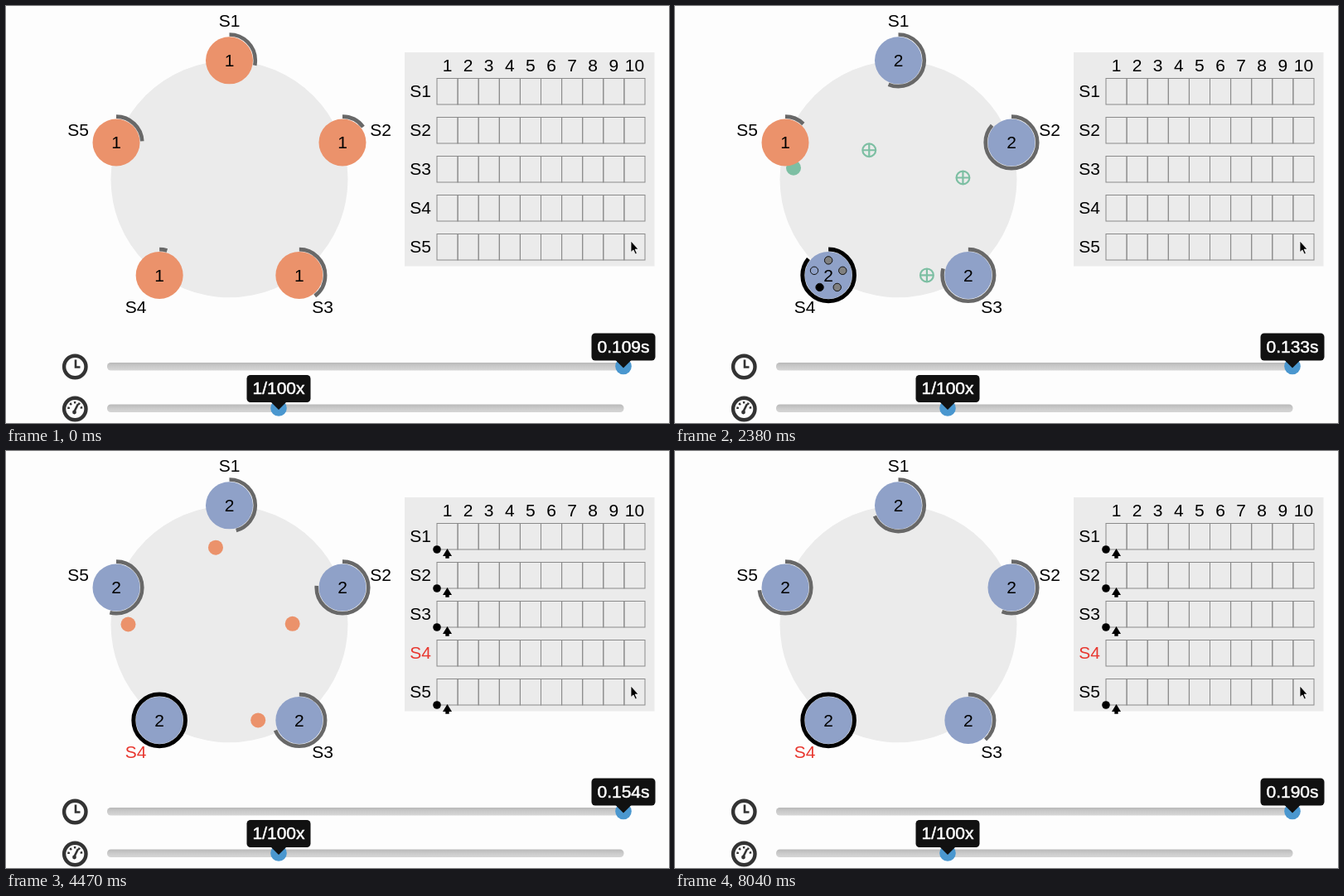
An HTML page for the animation above (8.14 s loop, 800x504 px).

```html
<!DOCTYPE html>
<html lang="en">
<head>
<meta charset="utf-8">
<title>Leader election</title>
<style>
  html, body { margin: 0; width: 100%; height: 100%; overflow: hidden; background: #fdfdfd; }
  svg { display: block; }
  text { font: 21px "Liberation Sans", Arial, sans-serif; text-anchor: middle; }
  .tip { fill: #fff; stroke: #fff; stroke-width: .5px; }
</style>
</head>
<body>
<svg width="800" height="504" viewBox="0 0 800 504">
  <defs>
    <linearGradient id="groove" x2="0" y2="1">
      <stop offset="0" stop-color="#b9b9b9"/>
      <stop offset=".5" stop-color="#cbcbcb"/>
      <stop offset="1" stop-color="#d6d6d6"/>
    </linearGradient>
  </defs>
  <circle cx="269.5" cy="209.3" r="143" fill="#ebebeb"/>
  <g id="cluster"></g>
  <rect x="481" y="56" width="301.5" height="258.5" fill="#ebebeb"/>
  <g id="log"></g>
  <path d="M754 284v13.5l3-2.6 2.4 5 2-.9-2.3-4.9h4z" stroke="#fff" stroke-width=".8"/>
  <g fill="none" stroke="#333" stroke-width="4.4">
    <circle cx="83.3" cy="436" r="13.2"/>
    <circle cx="83.3" cy="487" r="13.2"/>
    <path d="M84 427.5v9h5.5" stroke-width="2.6"/>
    <path d="M82.5 490l4.5-9" stroke-width="2.6"/>
    <path d="M75.5 487a7.8 7.8 0 0 1 15.6 0" stroke-width="2.6" stroke-dasharray="2.4 3"/>
    <circle cx="82.5" cy="491" r="1.2" stroke-width="2.4"/>
  </g>
  <g id="sliders"></g>
</svg>
<script>
const LOOP = 8140, CLOCK = 109.45;
const ORANGE = '#eb926b', BLUE = '#8fa1c8', GREEN = '#7dbfa3';
const BODY = 28.5, LEAD = 3;
// Simulated milliseconds since the loop began
const ELECT = 9.55, WIN = 34;

// alarms: timer ends before the vote, after it, after the heartbeat
// at: arrival of vote request, vote, heartbeat, acknowledgement
const servers = [
  { label: [269.5, 18], alarms: [56.1, 136.2, 216.9], at: [19.8, 29.9, 46.1, 57.5] },
  { label: [452, 150], alarms: [29.4, 196.9, 192.3], at: [21.2, 34, 47.6, 60.1] },
  { label: [382, 364], alarms: [79.4, 182, 157.4], at: [21, 35.6, 47.2, 61.1] },
  { label: [156.5, 364], alarms: [ELECT, 195.7], at: [ELECT] },
  { label: [87, 150], alarms: [48.3, 152.6, 227], at: [24.3, 34.5, 46.8, 61.5] }
];
servers.forEach((s, i) => [s.x, s.y] = around(269.5, 209.3, 143.5, i));

// Start of each drawn step; a few steps last 140 ms, the rest 150 ms
const starts = [0];
for (let i = 0; i < 54; i++)
  starts.push(starts[i] + ([9, 14, 29, 37, 47, 52].includes(i) ? 140 : 150));

const $ = id => document.getElementById(id);

function around(x, y, r, i) {
  const a = i * Math.PI * .4;
  return [x + r * Math.sin(a), y - r * Math.cos(a)];
}

const circle = (x, y, r, attrs = '') => `<circle cx="${x}" cy="${y}" r="${r}" ${attrs}/>`;
const text = (x, y, str, attrs = '') => `<text x="${x}" y="${y + 7.4}" ${attrs}>${str}</text>`;

function message(from, to, start, end, now, color, reply) {
  if (now < start || now >= end) return '';
  const dx = to.x - from.x, dy = to.y - from.y, dist = Math.hypot(dx, dy);
  const f = (BODY + (now - start) / (end - start) * (dist - 2 * BODY)) / dist;
  const x = from.x + dx * f, y = from.y + dy * f;
  if (!reply) return circle(x, y, 9, `fill="${color}"`);
  return `<g fill="none" stroke="${color}" stroke-width="2.2">${circle(x, y, 7.9)}
    <path d="M${x - 8} ${y}h16M${x} ${y - 8}v16"/></g>`;
}

function messages(peer, now) {
  const lead = servers[LEAD], [ask, vote, beat, ack] = peer.at;
  return message(lead, peer, ELECT, ask, now, GREEN) +
    message(peer, lead, ask, vote, now, GREEN, true) +
    message(lead, peer, WIN, beat, now, ORANGE) +
    message(peer, lead, beat, ack, now, ORANGE, true);
}

function voteDots(now) {
  const { x, y } = servers[LEAD];
  return servers.map((s, i) => {
    const fill = i == LEAD || now >= s.at[1] ? '#000' : now >= s.at[0] ? '#808080' : 'none';
    return circle(...around(x, y, 18, i), 4.7, `fill="${fill}" stroke="#111"`);
  }).join('');
}

function server(s, i, now) {
  const { x, y, at, alarms } = s;
  const voted = now >= at[0], beaten = now >= at[2];
  const bold = i == LEAD && voted, leads = i == LEAD && now >= WIN;
  const angle = leads ? 360 : 1.8 * (alarms[beaten ? 2 : +voted] - now);
  const dash = leads ? '' : `pathLength="360" stroke-dasharray="${Math.max(0, angle)} 360"`;
  return circle(x, y, BODY, `fill="${voted ? BLUE : ORANGE}"`) +
    circle(x, y, 31.3, `fill="none" stroke="${bold ? '#000' : '#686868'}"
      stroke-width="${bold ? 5 : 4.6}" ${dash} transform="rotate(-90 ${x} ${y})"`) +
    (bold && !leads ? voteDots(now) : '') +
    text(x, y, voted ? 2 : 1) +
    text(...s.label, 'S' + (i + 1), leads ? 'fill="#e8372f"' : '');
}

function logRow(i, now) {
  const y = 87.5 + i * 47, leads = now >= WIN;
  let out = text(500, y + 15.5, 'S' + (i + 1), leads && i == LEAD ? 'fill="#e8372f"' : '');
  for (let c = 0; c < 10; c++)
    out += `<rect x="${520 + c * 25.1}" y="${y}" width="25.1" height="31.5" fill="none" stroke="#8a8a8a"/>`;
  if (leads && i != LEAD)
    out += circle(520, y + 31.5, 4.8) +
      `<path d="M532.5 ${y + 30.5}l5.5 9h-3.3v2.8h-4.4v-2.8h-3.3z"/>`;
  return out;
}

function slider(y, x, label) {
  return `<rect x="122" y="${y - 4.5}" width="623.5" height="9.5" rx="4.5" fill="url(#groove)"/>` +
    circle(x, y, 9.8, 'fill="#4a97cf"') +
    `<rect x="${x - 38.5}" y="${y - 40}" width="77" height="33" rx="4.5" fill="#111"/>
    <path d="M${x - 9.5} ${y - 7.5}h19l-9.5 9.5z" fill="#111"/>` +
    text(x, y - 24, label, 'class="tip"');
}

function draw(now) {
  $('cluster').innerHTML =
    servers.map((s, i) => i == LEAD ? '' : messages(s, now)).join('') +
    servers.map((s, i) => server(s, i, now)).join('');
  $('log').innerHTML =
    servers.map((s, c) => logRow(c, now)).join('') +
    Array.from({ length: 10 }, (_, c) => text(532.5 + c * 25.1, 72, c + 1)).join('');
  $('sliders').innerHTML =
    slider(435.5, 745, ((CLOCK + now) / 1000).toFixed(3) + 's') +
    slider(486, 329, '1/100x');
}

let shown = -1;
const origin = performance.now();
function tick() {
  const t = (performance.now() - origin) % LOOP;
  const start = starts.filter(s => s <= t).pop();
  if (start !== shown) draw((shown = start) / 100);
  requestAnimationFrame(tick);
}
tick();
</script>
</body>
</html>
```
